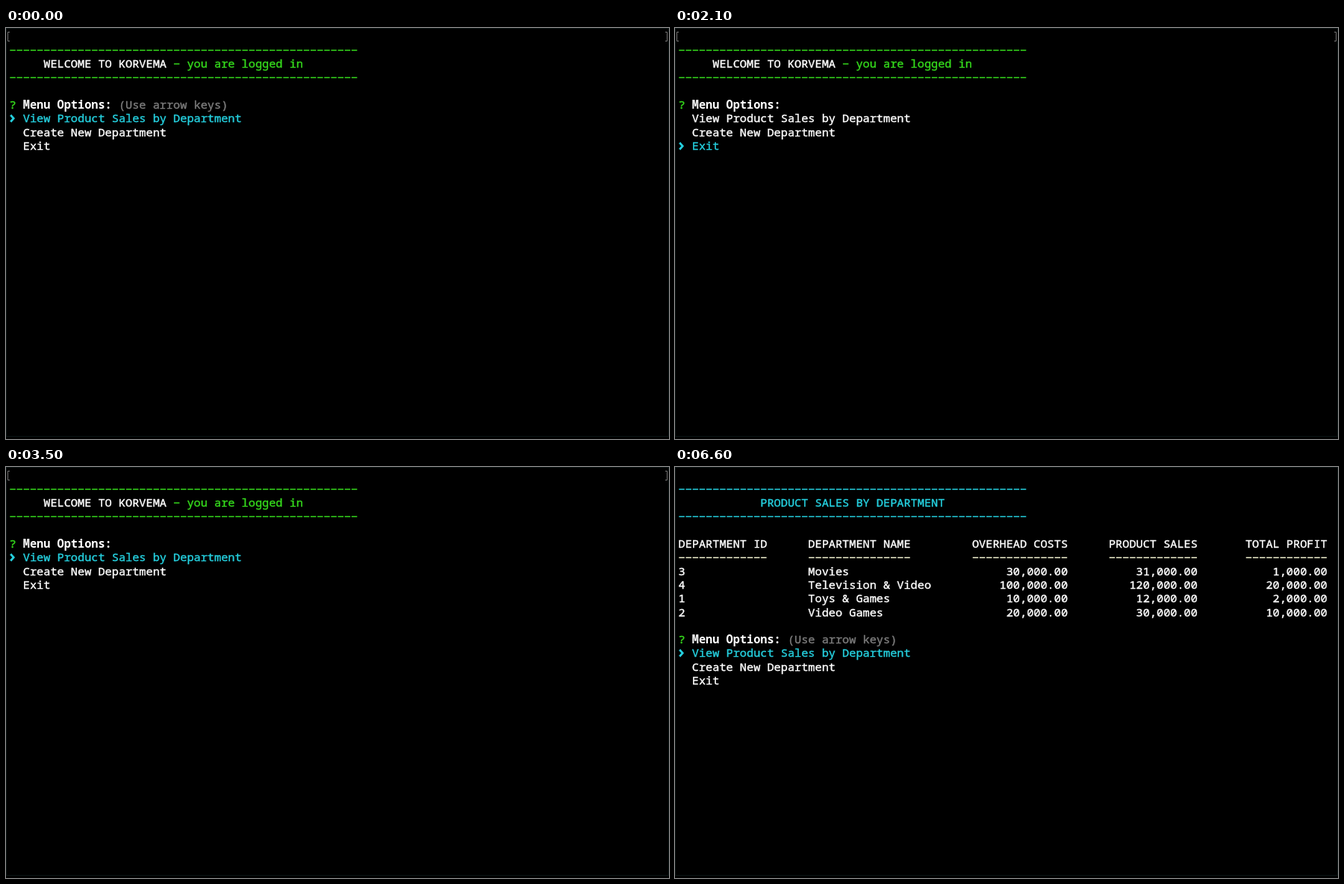
Write an HTML page with a canvas that moves like this. It is 888 by 550 pixels and loops after 8 s.

```html
<!DOCTYPE html>
<html lang="en">
<head>
<meta charset="utf-8">
<title>Terminal menu</title>
<style>
  html, body { margin: 0; width: 100%; height: 100%; overflow: hidden; background: #000; }
  canvas { display: block; }
</style>
</head>
<body>
<canvas id="screen" width="888" height="550"></canvas>
<script>
const ctx = document.getElementById('screen').getContext('2d');
const CELL = 9.15, LINE = 18.31, LEFT = 4.5, BASE = 16.4;
const WHITE = '#fff', GREEN = '#35d91c', CYAN = '#25d0df', GREY = '#7c7c7c', CREAM = '#f1f1cf';
const FONT = '15.25px "Noto Sans Mono", "DejaVu Sans Mono", monospace';
const LOOP = 8000;
const OPTIONS = ['View Product Sales by Department', 'Create New Department', 'Exit'];
const COLUMNS = [
  { at: 0, title: 'DEPARTMENT ID' },
  { at: 19, title: 'DEPARTMENT NAME' },
  { at: 43, title: 'OVERHEAD COSTS', right: true },
  { at: 63, title: 'PRODUCT SALES', right: true },
  { at: 83, title: 'TOTAL PROFIT', right: true }
];
const SALES = [
  ['3', 'Movies', 30000, 31000],
  ['4', 'Television & Video', 100000, 120000],
  ['1', 'Toys & Games', 10000, 12000],
  ['2', 'Video Games', 20000, 30000]
];

// Each character sits in its own terminal cell; hyphens are wide dashes.
// A thin outline gives the regular weight a medium look.
function write(row, col, text, color, bold = false) {
  ctx.font = `${bold ? 700 : 400} ${FONT}`;
  ctx.fillStyle = ctx.strokeStyle = color;
  ctx.lineWidth = 0.4;
  const y = BASE + row * LINE, base = Math.round(y);
  [...text].forEach((ch, i) => {
    const x = LEFT + (col + i) * CELL;
    if (ch === '-') {
      ctx.fillRect(x + 0.8, y - 5.7, 7.5, 1.5);
    } else if (ch !== ' ') {
      ctx.fillText(ch, x, base);
      if (!bold) ctx.strokeText(ch, x, base);
    }
  });
}

function rule(row, color, col = 0, length = 51) {
  write(row, col, '-'.repeat(length), color);
}

function stroke(color, width, points) {
  ctx.strokeStyle = color;
  ctx.lineWidth = width;
  ctx.beginPath();
  points.forEach(([x, y]) => ctx.lineTo(x, y));
  ctx.stroke();
}

function pointer(row) {
  const x = LEFT + 1.7, y = Math.round(BASE + row * LINE) - 5;
  stroke(CYAN, 2.7, [[x, y - 4.5], [x + 4, y], [x, y + 4.5]]);
}

function menu(row, selected, hint) {
  write(row, 0, '?', GREEN);
  write(row, 2, 'Menu Options:', WHITE, true);
  if (hint) write(row, 16, '(Use arrow keys)', GREY);
  OPTIONS.forEach((text, i) => write(row + 1 + i, 2, text, i === selected ? CYAN : WHITE));
  pointer(row + 1 + selected);
}

function welcome(selected, hint) {
  for (const [spine, tip] of [[2.5, 5], [885.5, 883]]) {
    stroke('#777', 1, [[tip, 5.5], [spine, 5.5], [spine, 17.5], [tip, 17.5]]);
  }
  rule(1, GREEN);
  write(2, 5, 'WELCOME TO KORVEMA', WHITE);
  write(2, 24, '- you are logged in', GREEN);
  rule(3, GREEN);
  menu(5, selected, hint);
}

function report() {
  const money = n => n.toLocaleString('en-US', { minimumFractionDigits: 2 });
  rule(1, CYAN);
  write(2, 12, 'PRODUCT SALES BY DEPARTMENT', CYAN);
  rule(3, CYAN);
  COLUMNS.forEach(({ at, title }) => {
    write(5, at, title, WHITE);
    rule(6, CREAM, at, title.length);
  });
  SALES.forEach(([id, name, cost, sales], r) => {
    const cells = [id, name, money(cost), money(sales), money(sales - cost)];
    cells.forEach((text, c) => {
      const { at, title, right } = COLUMNS[c];
      write(7 + r, at + (right ? title.length - text.length : 0), text, WHITE);
    });
  });
  menu(12, 0, true);
}

function draw(now) {
  const t = now % LOOP;
  ctx.fillStyle = '#000';
  ctx.fillRect(0, 0, 888, 550);
  ctx.strokeStyle = '#0b1414';
  ctx.lineWidth = 1;
  ctx.strokeRect(0.5, 0.5, 887, 546);
  if (t >= 4500) {
    report();
  } else {
    // The selection walks down the list and back up, one step per second.
    const step = Math.floor((t + 500) / 1000);
    welcome(2 - Math.abs(2 - step), step === 0);
  }
}

const start = performance.now();
function frame() {
  draw(performance.now() - start);
  requestAnimationFrame(frame);
}
frame();
</script>
</body>
</html>
```
